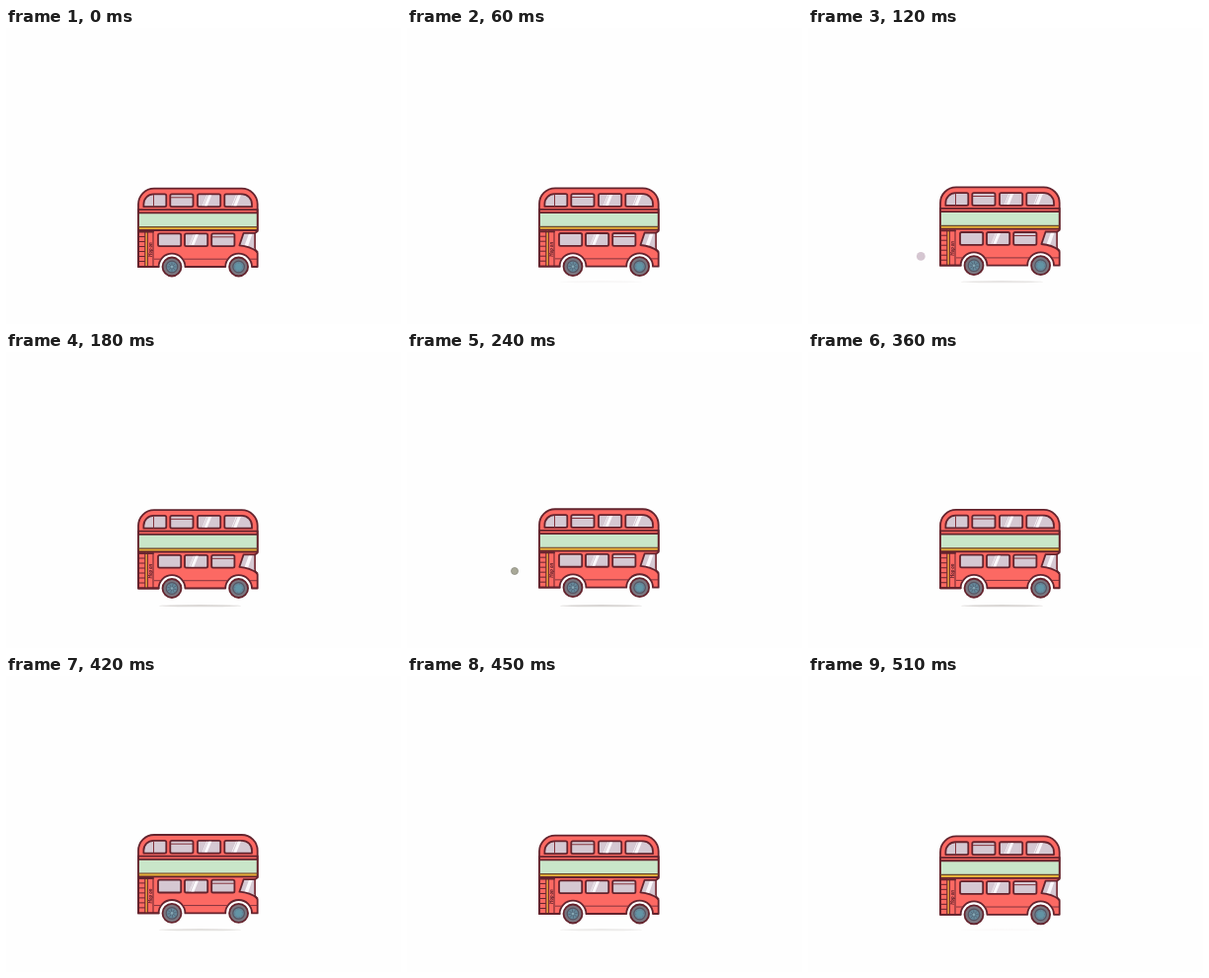
Write an HTML page that moves like this. It is 400 px wide and 300 px high and loops after 540 ms.

```html
<!DOCTYPE html>
<html lang="en">
<head>
<meta charset="utf-8">
<title>Bouncing bus</title>
<style>
html, body { margin: 0; width: 100%; height: 100%; overflow: hidden; background: #fefefe; }
svg { display: block; width: 100vw; height: 100vh; }
.ink { stroke: #64232d; stroke-width: 1.8; stroke-linejoin: round; stroke-linecap: round; }
.thin { stroke: #84343d; stroke-width: 1; fill: none; }
.glass { fill: #d5c8d2; }
</style>
</head>
<body>
<svg viewBox="0 0 400 300">
  <defs>
    <g id="wheel">
      <circle r="9.5" fill="#7b767f" class="ink"/>
      <circle r="5.8" fill="#66899b" stroke="#565563" stroke-width="1.2"/>
    </g>
    <path id="glint" fill="#fbf8fb" d="M0 5.4L4.4 -5.4H7.6L3.2 5.4ZM-1.8 5.4L2.6 -5.4H3.3L-1.1 5.4Z"/>
  </defs>
  <ellipse id="shadow" cx="196.5" cy="257.2" rx="41.5" ry="1.1" fill="#d9d6d4"/>
  <circle id="puff"/>
  <g id="bus">
    <path class="ink" fill="#fc6963" d="M134 242V178.6A16 16 0 0 1 150 162.6H238.7A16 16 0 0 1 254.7 178.6V206L252 208V224L254.7 228V242H249A13.4 13.4 0 0 0 222.2 242H181.4A13.4 13.4 0 0 0 154.6 242Z"/>
    <path class="thin" d="M150 234.2H157M179 234.2H224.5M247 234.2H254"/>

    <rect x="134" y="187.3" width="120.7" height="14.2" fill="#c9e6c9"/>
    <rect x="134" y="201.7" width="120.7" height="3" fill="#e9b43b"/>
    <path class="ink" fill="none" d="M134 184.2H254.7M134 187.4H254.7M134 205H254.7M134 184V205M254.7 184V205"/>
    <path d="M134 201.6H254.7" stroke="#6b4a2c" stroke-width="1.2"/>

    <g class="ink glass" id="panes">
      <path d="M139.4 181.2V178.4A10 10 0 0 1 149.4 168.4H160.7Q162.3 168.4 162.3 170V179.6Q162.3 181.2 160.7 181.2Z"/>
      <path d="M221.3 170Q221.3 168.4 222.9 168.4H239A10 10 0 0 1 249 178.4V181.2H222.9Q221.3 181.2 221.3 179.6Z"/>
    </g>
    <path class="glass" d="M240.6 208H251.6V224L236.4 220.5Z"/>
    <path fill="#fbf8fb" d="M241.5 220.5L246 208.5H249.5L245 221.5Z"/>
    <path class="thin" d="M251.8 208V223"/>
    <path class="ink" fill="none" d="M251.6 207.8H240.6L236.4 220.3Q247 221 254.5 226.8"/>
    <path class="thin" d="M149.5 169V181M167 171.8H189M209 211.8H231"/>
    <use href="#glint" x="200.6" y="174.8"/>
    <use href="#glint" x="230.3" y="174.8"/>
    <use href="#glint" x="187.3" y="214.7"/>

    <path id="ladder" class="thin" style="stroke:#64232d"/>
    <rect x="141.2" y="206" width="2" height="35.2" fill="#e9a63b"/>
    <path class="thin" style="stroke:#64232d" d="M140.8 206V241.5M143.4 206V241.5M149 206V241.5"/>
    <text transform="translate(148 232) rotate(-90)" font-family="Lato, sans-serif" font-size="4.8" font-weight="900" font-style="italic" fill="#64232d">Hop on</text>
    <path class="ink" fill="none" d="M134 206V242H154.6M134 206.6H149"/>

    <use href="#wheel" x="168" y="242"/>
    <use href="#wheel" x="235.6" y="242"/>
    <path class="spokes" data-x="168" stroke="#4f5f70" stroke-width=".7"/>
    <path class="spokes" data-x="235.6" stroke="#547688" stroke-width=".5"/>
    <circle cx="168" cy="242" r="1.3" fill="#86a9b6"/>
    <circle cx="235.6" cy="242" r="3.4" fill="#6394a5"/>
  </g>
</svg>
<script>
const LOOP = 540, STEP = 30;
const $ = id => document.getElementById(id);
const svgNS = "http://www.w3.org/2000/svg";
const set = (el, attrs) => {
  for (const k in attrs) el.setAttribute(k, attrs[k]);
  return el;
};

// Rectangular windows: two above, three below.
for (const [x, y] of [[166.3, 168.4], [194, 168.4], [154, 208.3], [181, 208.3], [208.2, 208.3]]) {
  const pane = set(document.createElementNS(svgNS, "rect"),
    { x, y, width: 23.2, height: 12.8, rx: 1.6 });
  $("panes").append(pane);
}

let rungs = "";
for (let y = 211.5; y < 241; y += 5) rungs += `M134.5 ${y}H140.8`;
set($("ladder"), { d: rungs });

let star = "";
for (let i = 0; i < 4; i++) {
  const a = i * Math.PI / 4, c = 4.6 * Math.cos(a), s = 4.6 * Math.sin(a);
  star += `M${-c} ${-s}L${c} ${s}`;
}
const spokes = [...document.querySelectorAll(".spokes")];
spokes.forEach(p => set(p, { d: star }));

const puffs = [
  { from: 120, to: 150, x: 114.3, y: 231.4, r: 4.4, fill: "#d5c6d1", stroke: "none" },
  { from: 240, to: 300, x: 109, y: 222, r: 3.5, fill: "#a9a998", stroke: "#8f8e83" }
];

function draw(ms) {
  const t = Math.floor((ms % LOOP) / STEP) * STEP;
  const lift = t ? (1 - Math.cos(2 * Math.PI * (t - 8) / LOOP)) / 2 : 0;
  set($("bus"), { transform: `translate(0 ${-3.5 * lift})` });
  set($("shadow"), { opacity: 1 - (1 - lift) ** 2 });
  spokes.forEach(p => set(p, {
    transform: `translate(${p.dataset.x} 242) rotate(${45 * t / LOOP})`
  }));

  const p = puffs.find(q => t >= q.from && t < q.to);
  $("puff").style.display = p ? "" : "none";
  if (p) {
    const age = t - p.from;
    set($("puff"), {
      cx: p.x - age * .08, cy: p.y - age * .07, r: p.r,
      fill: p.fill, stroke: p.stroke, "stroke-width": .8
    });
  }
}

const start = performance.now();
function tick() {
  draw(performance.now() - start);
  requestAnimationFrame(tick);
}
draw(0);
requestAnimationFrame(tick);
</script>
</body>
</html>
```
